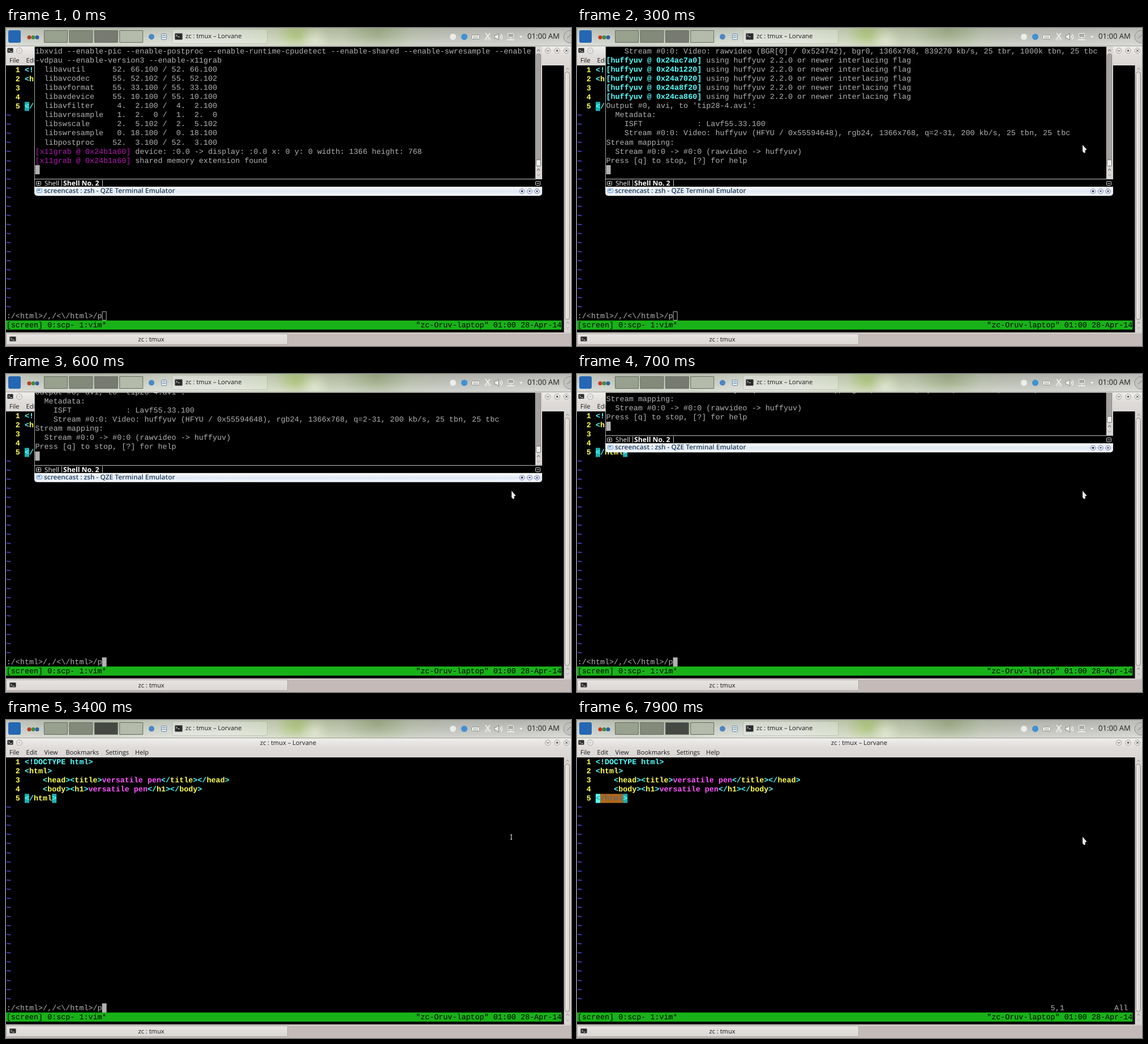
Write an HTML page with a canvas that moves like this. It is 998x561 px and loops after 8000 ms.

```html
<!DOCTYPE html>
<html lang="en">
<head>
<meta charset="utf-8">
<title>Terminal screencast</title>
<style>
html, body { margin: 0; width: 998px; height: 561px; overflow: hidden; background: #000; }
canvas { display: block; }
</style>
</head>
<body>
<canvas id="stage" width="998" height="561"></canvas>
<script>
const g = document.getElementById('stage').getContext('2d');
g.textRendering = 'geometricPrecision';

const LOOP = 8000;
const CW = 998 * 11 / 1366, CH = 998 * 22 / 1366;   // terminal cell
const FG = '#b2b2b2', TEAL = '#18b2b2', CYAN = '#54ffff', YELLOW = '#ffff54',
      PINK = '#ff54ff', PURPLE = '#b218b2', BLUE = '#5454ff', GREEN = '#18b218', LIME = '#54ff54';
const TITLE = 'zc : tmux – Lorvane';

function rect(x, y, w, h, fill) {
  g.fillStyle = fill;
  g.fillRect(x, y, w, h);
}
function box(x, y, w, h, r, fill, stroke) {
  g.beginPath();
  g.roundRect(x, y, w, h, r);
  paint(fill, stroke);
}
function disc(x, y, r, fill, stroke) {
  g.beginPath();
  g.arc(x, y, r, 0, 7);
  paint(fill, stroke);
}
function poly(points, fill, stroke, width) {
  g.beginPath();
  points.forEach(p => g.lineTo(p[0], p[1]));
  if (fill) g.closePath();
  paint(fill, stroke, width);
}
function paint(fill, stroke, width = 1) {
  if (fill) { g.fillStyle = fill; g.fill(); }
  if (stroke) { g.strokeStyle = stroke; g.lineWidth = width; g.stroke(); }
}
function fade(x0, y0, x1, y1, ...stops) {
  const f = g.createLinearGradient(x0, y0, x1, y1);
  stops.forEach((c, i) => f.addColorStop(i / (stops.length - 1), c));
  return f;
}
function glow(x, y, r, rgb, alpha) {
  const f = g.createRadialGradient(x, y, 0, x, y, r);
  f.addColorStop(0, `rgba(${rgb},${alpha})`);
  f.addColorStop(1, `rgba(${rgb},0)`);
  rect(x - r, 0, 2 * r, 32, f);
}
function label(s, x, y, size = 11.1, color = '#1c1c1c', weight = 400) {
  g.font = `${weight} ${size}px "Open Sans", "Noto Sans", sans-serif`;
  g.fillStyle = color;
  g.fillText(s, x, y);
}
function chevron(x, y, d, color = '#444') {
  poly([[x - 2.5, y + d], [x, y - d], [x + 2.5, y + d]], null, color);
}

// Text on the terminal grid; origin is set by translate()
function cells(s, col, row, color = FG, bold = false) {
  g.font = `${bold ? 'bold ' : ''}13.39px "Liberation Mono", "Courier New", monospace`;
  g.fillStyle = color;
  [...s].forEach((c, i) => {
    if (c !== ' ') g.fillText(c, (col + i) * CW, row * CH + 11.8);
  });
}
function block(col, row, n, color) {
  rect(col * CW, row * CH, n * CW, CH, color);
}

const page = ['<!DOCTYPE html>', '<html>',
  '    <head><title>versatile pen</title></head>',
  '    <body><h1>versatile pen</h1></body>', '</html>'];

function markup(s, row) {
  let inTag = false;
  [...s].forEach((c, i) => {
    if (c === '<') inTag = true;
    const color = /[<>\/]/.test(c) || s[1] === '!' ? CYAN : inTag ? YELLOW : PINK;
    cells(c, 4 + i, row, color, true);
    if (c === '>') inTag = false;
  });
}
const lineNo = (n, row) => cells(String(n), 2, row, YELLOW, true);
function tildes(from) {
  for (let r = from; r < from + 22; r++) cells('~', 0, r, BLUE, true);
}
function lastLine(row, selected) {
  lineNo(5, row);
  block(4, row, 1, selected ? CYAN : TEAL);
  block(10, row, 1, TEAL);
  if (selected) {
    block(5, row, 5, '#b26818');
    cells('<', 4, row, TEAL, true);
    cells('/html', 5, row, '#686868', true);
    cells('>', 10, row, CYAN, true);
  } else markup(page[4], row);
}

function vim(t) {
  g.save();
  g.translate(0.8, 66);
  if (t >= 3500 && t < 7900) {
    lastLine(0);
    tildes(1);
    for (let i = 1; i < 5; i++) {
      lineNo(i + 1, 22 + i);
      cells(page[i], 4, 22 + i);
    }
    cells('Press ENTER or type command to continue', 0, 27, LIME, true);
    block(39, 27, 1, FG);
  } else {
    for (let i = 0; i < 4; i++) {
      lineNo(i + 1, i);
      markup(page[i], i);
    }
    lastLine(4, t >= 7900);
    tildes(5);
    if (t >= 7900) {
      cells('5,1', 104, 27);
      cells('All', 118, 27);
    } else {
      cells(':/<html>/,/<\\/html>/p', 0, 27);
      if (t >= 500) block(21, 27, 1, FG);
      else box(21 * CW + .5, 27 * CH + .5, CW - 1, CH - 1, 0, null, FG);
    }
  }
  block(-.1, 28, 122.1, GREEN);
  cells('[screen] 0:scp- 1:vim*', 0, 28, '#000');
  cells('"zc-Oruv-laptop" 01:00 28-Apr-14', 90, 28, '#000');
  g.restore();
}

const libs = [['util', 52, 66, 100], ['codec', 55, 52, 102], ['format', 55, 33, 100],
  ['device', 55, 10, 100], ['filter', 4, 2, 100], ['resample', 1, 2, 0]]
  .map(([n, ...v]) => ['libav' + n, ...v])
  .concat([['libswscale', 2, 5, 102], ['libswresample', 0, 18, 100], ['libpostproc', 52, 3, 100]])
  .map(([n, a, b, c]) => {
    const v = [a, b, c].map((x, i) => String(x).padStart(i ? 3 : 2)).join('.');
    return '  ' + n.padEnd(15) + v + ' / ' + v;
  });
const startLog = [
  'ibxvid --enable-pic --enable-postproc --enable-runtime-cpudetect --enable-shared --enable-swresample --enable',
  '-vdpau --enable-version3 --enable-x11grab', ...libs,
  '[x11grab @ 0x24b1a60] device: :0.0 -> display: :0.0 x: 0 y: 0 width: 1366 height: 768',
  '[x11grab @ 0x24b1a60] shared memory extension found'];
const runLog = [
  '    Stream #0:0: Video: rawvideo (BGR[0] / 0x524742), bgr0, 1366x768, 839270 kb/s, 25 tbr, 1000k tbn, 25 tbc',
  ...['ac7a0', 'b1220', 'a7020', 'a8f20', 'ca860'].map(a =>
    `[huffyuv @ 0x24${a}] using huffyuv 2.2.0 or newer interlacing flag`),
  "Output #0, avi, to 'tip28-4.avi':", '  Metadata:', '    ISFT            : Lavf55.33.100',
  '    Stream #0:0: Video: huffyuv (HFYU / 0x55594648), rgb24, 1366x768, q=2-31, 200 kb/s, 25 tbn, 25 tbc',
  'Stream mapping:', '  Stream #0:0 -> #0:0 (rawvideo -> huffyuv)',
  'Press [q] to stop, [?] for help'];

// Drop-down terminal, sliding up in five equal steps
function dropdown(t) {
  const step = Math.max(0, Math.floor((t - 400) / 100));
  if (step > 4) return;
  g.save();
  g.beginPath();
  g.rect(0, 33, 998, 528);
  g.clip();
  g.translate(0, -52.6 * step);
  rect(50, 33, 897, 249, '#000');
  rect(50, 33, 1, 249, '#a8a8a8');

  g.save();
  g.translate(51.5, 33);
  (t < 200 ? startLog : runLog).forEach((s, row) => {
    if (s[0] === '[') {
      const run = t >= 200;
      cells(s.slice(0, 21), 0, row, run ? CYAN : PURPLE, run);
      cells(s.slice(21), 21, row);
    } else cells(s, 0, row);
  });
  block(0, 13, 1, FG);
  g.restore();

  rect(935, 33, 12, 233, '#d8d5d3');
  box(936.5, 45.5, 8, 198, 3, '#a5a2a0', '#8b8886');
  box(936.5, 232.5, 8, 11, 2, '#efedeb', '#6e6c6a');
  chevron(940.5, 39.5, 1.5);
  chevron(940.5, 250, 1.5);
  chevron(940.5, 259.5, -1.5, '#999');

  rect(50, 266, 897, 1, '#c8c8c8');
  for (const x of [53.5, 935.5]) {
    box(x, 270.5, 8, 7, 1, null, '#ddd');
    rect(x + 2, 273.5, 4, 1, '#fff');
  }
  rect(57, 272, 1, 4, '#fff');
  label('Shell', 68, 278, 11.7, '#eee');
  label('Shell No. 2', 101, 278, 12.2, '#fff', 700);
  rect(98, 268, 1, 11, '#ccc');
  rect(170, 268, 1, 11, '#ccc');

  box(50, 280, 897, 16, [0, 0, 5, 5], fade(0, 280, 0, 296, '#fff', '#dfe8f2', '#f7faff'));
  box(54.5, 283.5, 9, 7, 1, '#d5e6f7', '#6f9ccc');
  rect(56, 285, 4, 2, '#4d82ba');
  label('screencast : zsh - QZE Terminal Emulator', 67, 291.3, 11.9, '#25405f', 600);
  for (const x of [911.5, 925, 938]) disc(x, 288, 4.4, '#e3e8f5', '#8088aa');
  disc(911.5, 288, 1.8, '#26304f');
  poly([[923, 287], [927, 287], [925, 289.5]], '#26304f');
  cross(938, 288, 1.8, '#26304f');
  g.restore();
}

function cross(x, y, r, color) {
  poly([[x - r, y - r], [x + r, y + r]], null, color);
  poly([[x - r, y + r], [x + r, y - r]], null, color);
}
function termIcon(x, y, w, h) {
  box(x, y, w, h, 1, '#2b2b2b', '#777');
  poly([[x + 2, y + 2.5], [x + 4, y + 4], [x + 2, y + 5.5]], null, '#eee');
  rect(x + 5, y + 5.5, 3, 1, '#eee');
}

function panel(t) {
  // blurred wallpaper behind the panel
  rect(0, 0, 998, 33, fade(0, 0, 998, 0, '#c8cbc3', '#bcc2b3', '#bfc6b4', '#cfd3c9', '#cfd4c6',
    '#bfcaa8', '#b7c0a5', '#b5bca8', '#b9bbb4', '#bcbcb8', '#c6c6c2'));
  glow(512, 12, 34, '150,185,70', .5);
  glow(545, 22, 26, '235,240,215', .5);
  glow(655, 6, 60, '110,135,75', .4);
  rect(0, 0, 998, 33, fade(0, 0, 0, 33, 'rgba(90,95,80,.1)', 'rgba(255,255,255,.1)', 'rgba(255,255,255,.4)'));
  rect(0, 31, 998, 1, '#a9aaa3');

  box(4, 4, 22, 22, 3, '#2467b5');
  [['#c0392b', 41], ['#3f8f3a', 48], ['#2d5fa8', 55]].forEach(([c, x]) => disc(x, 16.5, 3.5, c));
  ['#98a08e', '#838a7a', t < 900 ? '#777a70' : '#464943', '#b4bbab'].forEach((c, i) =>
    box(67.5 + 44.4 * i, 4.5, 41, 21, 0, c, '#676c61'));
  disc(257, 15.5, 5, '#4b86c8');
  box(274.5, 10.5, 9, 10, 1, '#dbe6ef', '#6d8ba6');
  rect(276, 13, 6, 1, '#6d8ba6');
  rect(276, 16, 6, 1, '#6d8ba6');

  box(293.5, 2.5, 168, 25, 3, 'rgba(240,242,236,.28)', 'rgba(140,145,130,.35)');
  termIcon(298.5, 9.5, 13, 11);
  label(TITLE, 317, 18.3);

  disc(789.5, 15.5, 5.5, '#ecece8');
  disc(809.5, 15.5, 5.5, '#3f92d2');
  box(822.5, 12.5, 14, 7, 1, '#f0f0ee', '#96968f');
  rect(825, 15, 9, 1, '#a5a59f');
  rect(825, 17, 9, 1, '#b5b5af');
  poly([[847, 9], [854, 18]], null, '#f4f4f2', 1.5);
  poly([[855, 9], [848, 18]], null, '#f4f4f2', 1.5);
  disc(848, 19.5, 1.8, null, '#f4f4f2');
  disc(854, 19.5, 1.8, null, '#f4f4f2');
  poly([[863, 13], [866, 13], [870, 9.5], [870, 21.5], [866, 18], [863, 18]], '#f4f4f2', '#85857f');
  for (const r of [3, 6]) {
    g.beginPath();
    g.arc(870.5, 15.5, r, -.9, .9);
    paint(null, '#f4f4f2', 1.3);
  }
  box(886.5, 9.5, 10, 7, 1, '#aaa', '#f4f4f2');
  rect(891, 17, 1, 4, '#f4f4f2');
  rect(885, 20, 13, 1.5, '#f4f4f2');
  poly([[907, 14], [912.5, 14], [909.7, 17.5]], '#f4f4f2');
  label('01:00 AM', 921, 19, 13.1, '#222');
  disc(996, 15.5, 11, 'rgba(190,190,186,.7)', '#92928d');
  poly([[991, 18], [998, 12]], null, '#777');
}

function windowFrame() {
  rect(0, 33, 998, 33, fade(0, 33, 0, 66, '#efeeec', '#dedbd9', '#dad7d5'));
  termIcon(2.5, 35.5, 10, 8);
  disc(23.5, 40, 5, '#e9e7e5', '#aaa7a4');
  disc(23.5, 40, 1, '#999');
  g.textAlign = 'center';
  label(TITLE, 498.3, 44.3);
  g.textAlign = 'left';
  for (const x of [957, 973.5, 990]) disc(x, 40, 4.8, '#eae8e6', '#a5a29f');
  chevron(957, 40, -1.2);
  poly([[973.5, 38], [975.5, 40], [973.5, 42], [971.5, 40]], '#444');
  cross(990, 40, 2, '#444');
  [['File', 6], ['Edit', 35.5], ['View', 67.5], ['Bookmarks', 105.5], ['Settings', 176], ['Help', 228]]
    .forEach(([s, x]) => label(s, x, 60.5));

  rect(0, 66, 986, 471, '#000');
  rect(985.5, 66, 12.5, 471, '#d8d5d3');
  box(987.5, 77.5, 8, 437, 4, fade(987, 0, 996, 0, '#ebe9e7', '#d8d5d3'), '#8c8885');
  chevron(992, 72, 1.5, '#888');
  chevron(992, 520, 1.5, '#888');
  chevron(992, 529, -1.5, '#aaa');

  rect(0, 537, 998, 24, '#c4bbb9');
  rect(0, 537, 998, 2, '#d2ccca');
  box(.5, 539.5, 497, 19, 2, fade(0, 540, 0, 559, '#e6e3e1', '#dbd7d5'), '#aaa4a1');
  termIcon(6.5, 544.5, 11, 8);
  label('zc : tmux', 233.5, 553.3);
}

function pointer(t) {
  if (t < 300) return;
  if (t >= 3400 && t < 7900) {
    rect(892, 203, 1, 8, '#e8e8e8');
    rect(891, 202, 3, 1, '#e8e8e8');
    rect(891, 210, 3, 1, '#e8e8e8');
  } else {
    poly([[893, 206], [900.5, 214.5], [897.5, 216], [898, 219.5], [895.5, 220.5], [893, 217.5]], '#e6e6e4');
  }
}

function draw(now) {
  const t = now % LOOP;
  panel(t);
  windowFrame();
  vim(t);
  dropdown(t);
  pointer(t);
}

let start;
function frame(now) {
  start ??= now;
  draw(now - start);
  requestAnimationFrame(frame);
}
requestAnimationFrame(frame);
</script>
</body>
</html>
```
